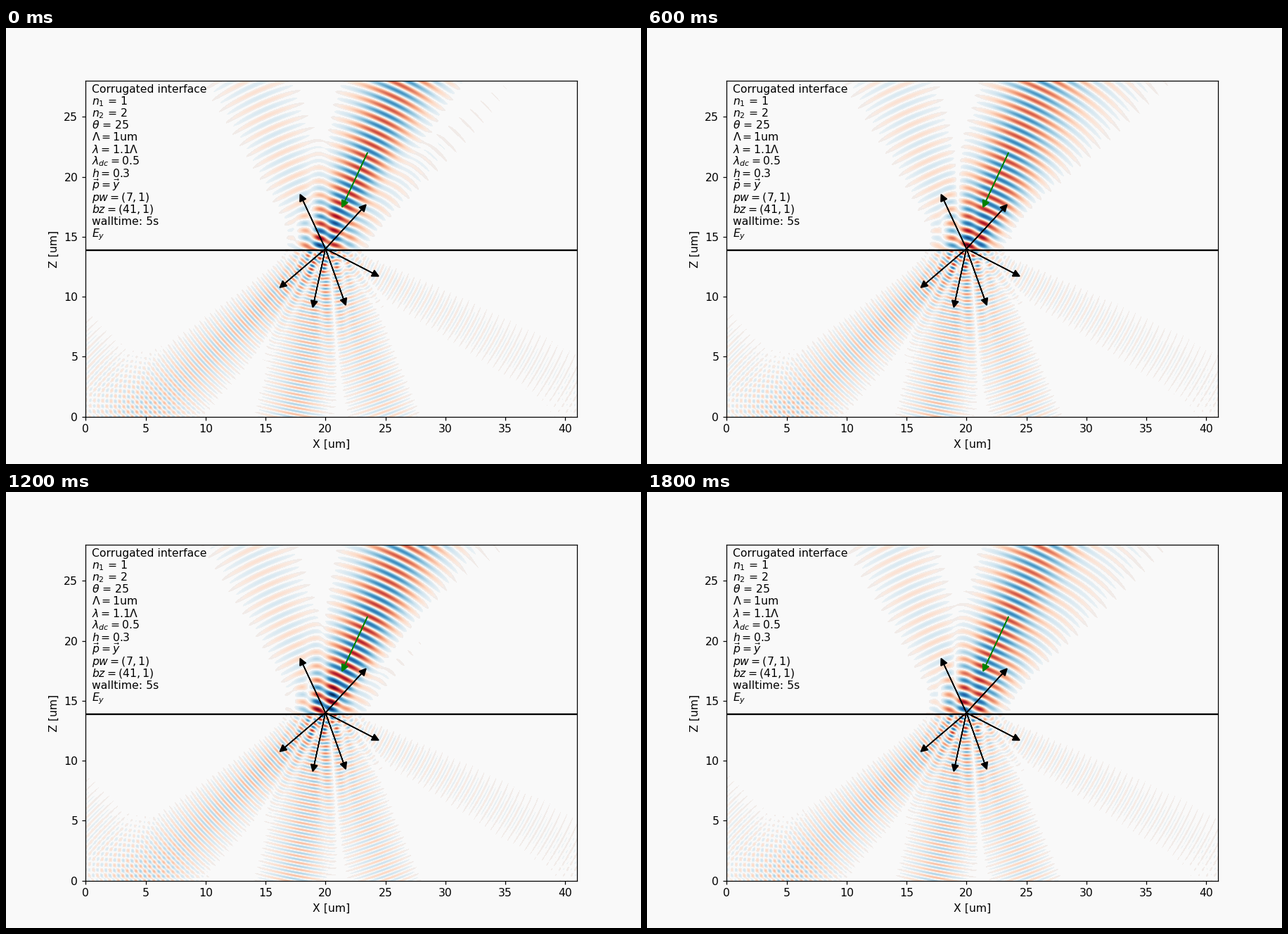
These frames come from a looping animation (903x620 px, 2000 ms). A matplotlib script:

```python
import numpy as np
import matplotlib.pyplot as plt
from matplotlib.animation import FuncAnimation
from matplotlib.colors import ListedColormap, to_rgb

W, H, DPI = 903, 620, 112
FRAMES, INTERVAL = 10, 200
BG = "#f9f9f9"

# Optics, lengths in um
SPAN_X, SPAN_Z = 41, 28
FOCUS_X, FOCUS_Z = 20, 14
INTERFACE = 13.87
N_LOW = 2
PERIOD = 1.0
WAVELENGTH = 1.1
THETA = np.radians(25)
WAIST = 1.85
PHASE = np.radians(157)
K = 2 * np.pi / WAVELENGTH
G = 2 * np.pi / PERIOD

# Diffraction order: (amplitude, angular tilt)
INCIDENT = 0.8
REFLECTED = {0: (-0.2, -1.2), 1: (0.13j, 0)}
TRANSMITTED = {-1: (-0.33j, -3), 0: (0.3, -3), 1: (0.24j, 0), 2: (-0.14, 0)}
FLOOR_ECHO = {-1: 0.45, 2: 0.4}


def plane_waves(x, z, kx, kz, amp):
    """Sum of plane waves on the grid z by x."""
    return (np.exp(1j * np.outer(z, kz)) * amp) @ np.exp(1j * np.outer(kx, x))


def k_normal(n, kx):
    return np.sqrt((n * K) ** 2 - kx ** 2 + 0j)


def build_field(nx=700, nz=478):
    x = (np.arange(nx) + 0.5) * SPAN_X / nx - FOCUS_X
    z = (np.arange(nz) + 0.5) * SPAN_Z / nz
    above = z > INTERFACE
    up, down = z[above] - FOCUS_Z, z[~above] - FOCUS_Z
    echo = -z[~above] - FOCUS_Z

    tilt = np.linspace(-0.7, 0.7, 181)
    beam = np.exp(-(K * np.sin(tilt) * WAIST / 2) ** 2)
    beam /= beam.sum()
    kx0 = -K * np.sin(THETA + tilt)

    field = np.zeros((nz, nx), complex)
    field[above] = plane_waves(x, up, kx0, -k_normal(1, kx0), INCIDENT * beam)
    for m, (amp, slope) in REFLECTED.items():
        kx = kx0 + m * G
        weight = amp * beam * np.exp(slope * tilt)
        field[above] += plane_waves(x, up, kx, k_normal(1, kx), weight)
    for m, (amp, slope) in TRANSMITTED.items():
        kx = kx0 + m * G
        kz = -k_normal(N_LOW, kx)
        weight = amp * beam * np.exp(slope * tilt)
        field[~above] += plane_waves(x, down, kx, kz, weight)
        if m in FLOOR_ECHO:
            field[~above] += FLOOR_ECHO[m] * plane_waves(x, echo, kx, kz, weight)
    return field * np.exp(-1j * PHASE)


def field_cmap():
    """Red-blue map with a flat centre and a warm grey first step."""
    v = np.linspace(-1, 1, 512)
    colors = plt.get_cmap("RdBu_r")((v + 1) / 2)[:, :3]
    colors[(v > 0) & (v < 0.07)] = to_rgb("#f1ebe8")
    colors[(v > -0.062) & (v < 0.048)] = to_rgb(BG)
    return ListedColormap(colors)


def arrow(x, z, angle, color="black", length=5):
    """Arrow at an angle in radians, clockwise from straight up."""
    ax.arrow(x, z, length * np.sin(angle), length * np.cos(angle),
             width=0.001, head_width=0.55, head_length=0.55, lw=1,
             length_includes_head=True, color=color, zorder=4)


plt.rcParams.update({"font.family": "DejaVu Sans", "font.size": 10.06})
fig = plt.figure(figsize=(W / DPI, H / DPI), dpi=DPI, facecolor=BG)
ax = fig.add_axes([0.125, 67.4 / H, 0.775, 0.77], facecolor=BG)

field = build_field()
image = ax.imshow(field.real, cmap=field_cmap(), vmin=-1, vmax=1,
                  origin="lower", extent=(0, SPAN_X, 0, SPAN_Z))
ax.set(xlim=(0, SPAN_X), ylim=(0, SPAN_Z), xlabel="X [um]", ylabel="Z [um]",
       xticks=range(0, 41, 5), yticks=range(0, 26, 5))
ax.axhline(INTERFACE, color="black", lw=1.5)

sin_in = np.sin(THETA)
for m in REFLECTED:
    arrow(FOCUS_X, FOCUS_Z, np.arcsin(-sin_in + m * WAVELENGTH / PERIOD))
for m in TRANSMITTED:
    sin_out = (-sin_in + m * WAVELENGTH / PERIOD) / N_LOW
    arrow(FOCUS_X, FOCUS_Z, np.pi - np.arcsin(sin_out))
arrow(23.5, 22, np.pi + THETA, "green")

NOTES = [
    "Corrugated interface",
    r"$n_1$ = 1",
    r"$n_2$ = 2",
    r"$\theta$ = 25",
    r"$\Lambda=1$um",
    r"$\lambda=1.1\Lambda$",
    r"$\lambda_{dc}=0.5$",
    r"$h=0.3$",
    r"$\vec{p}=\vec{y}$",
    r"$pw=(7,1)$",
    r"$bz=(41,1)$",
    "walltime: 5s",
    r"$E_y$",
]
for i, note in enumerate(NOTES):
    ax.text(0.5, 27 - i, note)


def update(i):
    image.set_data((field * np.exp(-2j * np.pi * i / FRAMES)).real)
    return [image]


anim = FuncAnimation(fig, update, frames=FRAMES, interval=INTERVAL,
                     repeat=True, repeat_delay=0)
plt.show()
```
